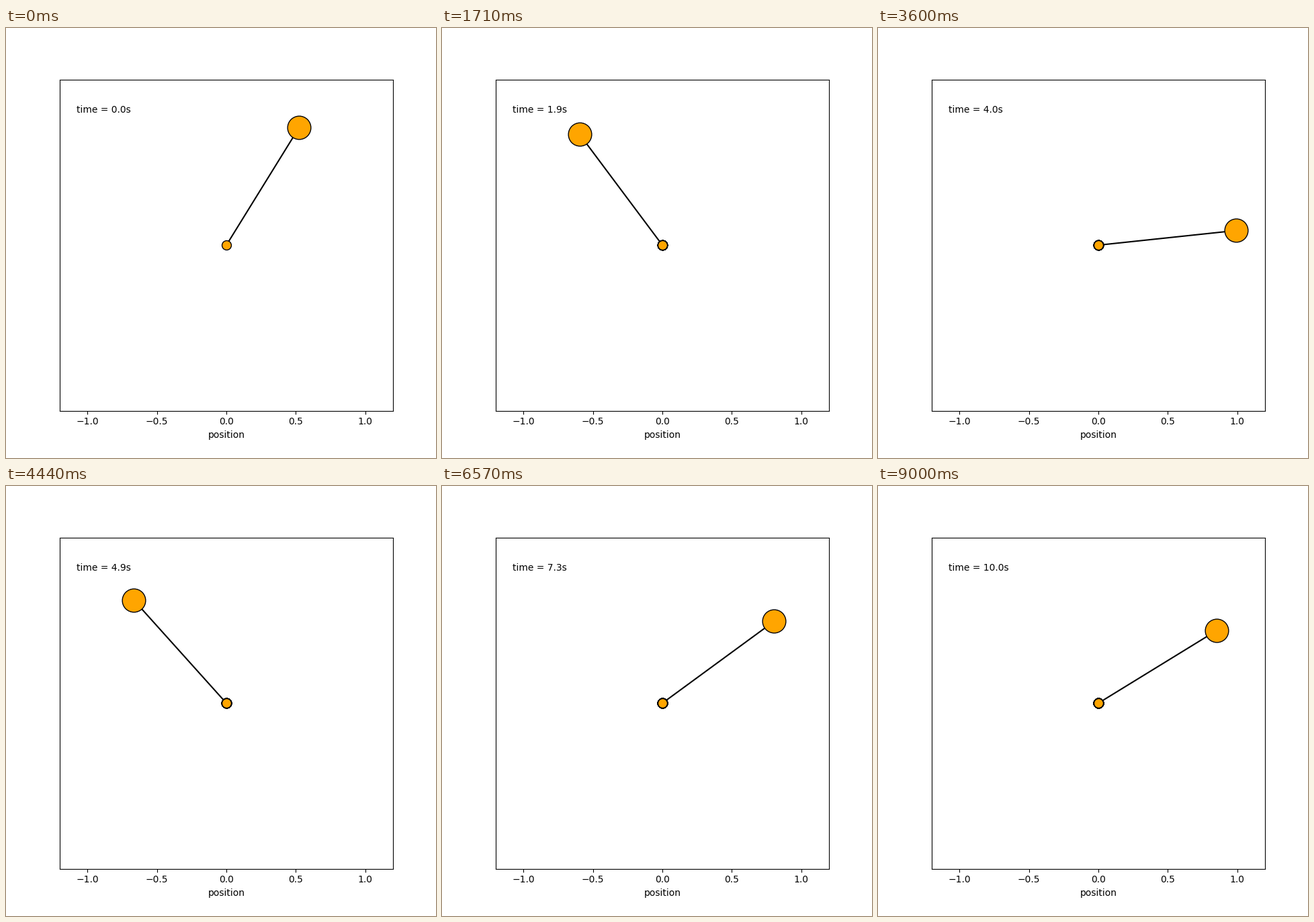
Write a matplotlib script that moves like this. It is 640 px wide and 640 px high and loops after 9.03 s.

```python
import numpy as np
import matplotlib.pyplot as plt
from matplotlib.animation import FuncAnimation

FRAMES = 301
DT = 1 / 30                 # simulated seconds per frame
SUBSTEPS = 20
GRAVITY = 9.819             # rod length is 1
START = np.radians([148.43, -6.35])   # angle from straight down, speed


def deriv(s):
    return np.array([s[1], -GRAVITY * np.sin(s[0])])


def rk4(s, h):
    k1 = deriv(s)
    k2 = deriv(s + h / 2 * k1)
    k3 = deriv(s + h / 2 * k2)
    k4 = deriv(s + h * k3)
    return s + h / 6 * (k1 + 2 * k2 + 2 * k3 + k4)


def swing():
    s = START
    angles = [s[0]]
    for _ in range(FRAMES - 1):
        for _ in range(SUBSTEPS):
            s = rk4(s, DT / SUBSTEPS)
        angles.append(s[0])
    return np.array(angles)


theta = swing()
xs, ys = np.sin(theta), -np.cos(theta)

fig, ax = plt.subplots(figsize=(6.4, 6.4), dpi=100)
ax.set(xlim=(-1.2, 1.2), ylim=(-1.2, 1.2), xlabel="position", yticks=[])

disc = dict(ls="", marker="o", color="orange", mec="black")
rod, = ax.plot([], [], color="black", lw=1.5)
bob, = ax.plot([], [], ms=25, **disc)
pivot, = ax.plot([], [], ms=10, **disc)
label = ax.text(0.05, 0.9, "", transform=ax.transAxes)


def update(n):
    rod.set_data([0, xs[n]], [0, ys[n]])
    bob.set_data([xs[n]], [ys[n]])
    # The pivot is painted over itself once per step, so its rim hardens.
    pivot.set_data(np.zeros(n + 1), np.zeros(n + 1))
    label.set_text(f"time = {n * DT:.1f}s")
    return rod, bob, pivot, label


anim = FuncAnimation(fig, update, frames=FRAMES, interval=30,
                     repeat=True, repeat_delay=0, cache_frame_data=False)
plt.show()
```
